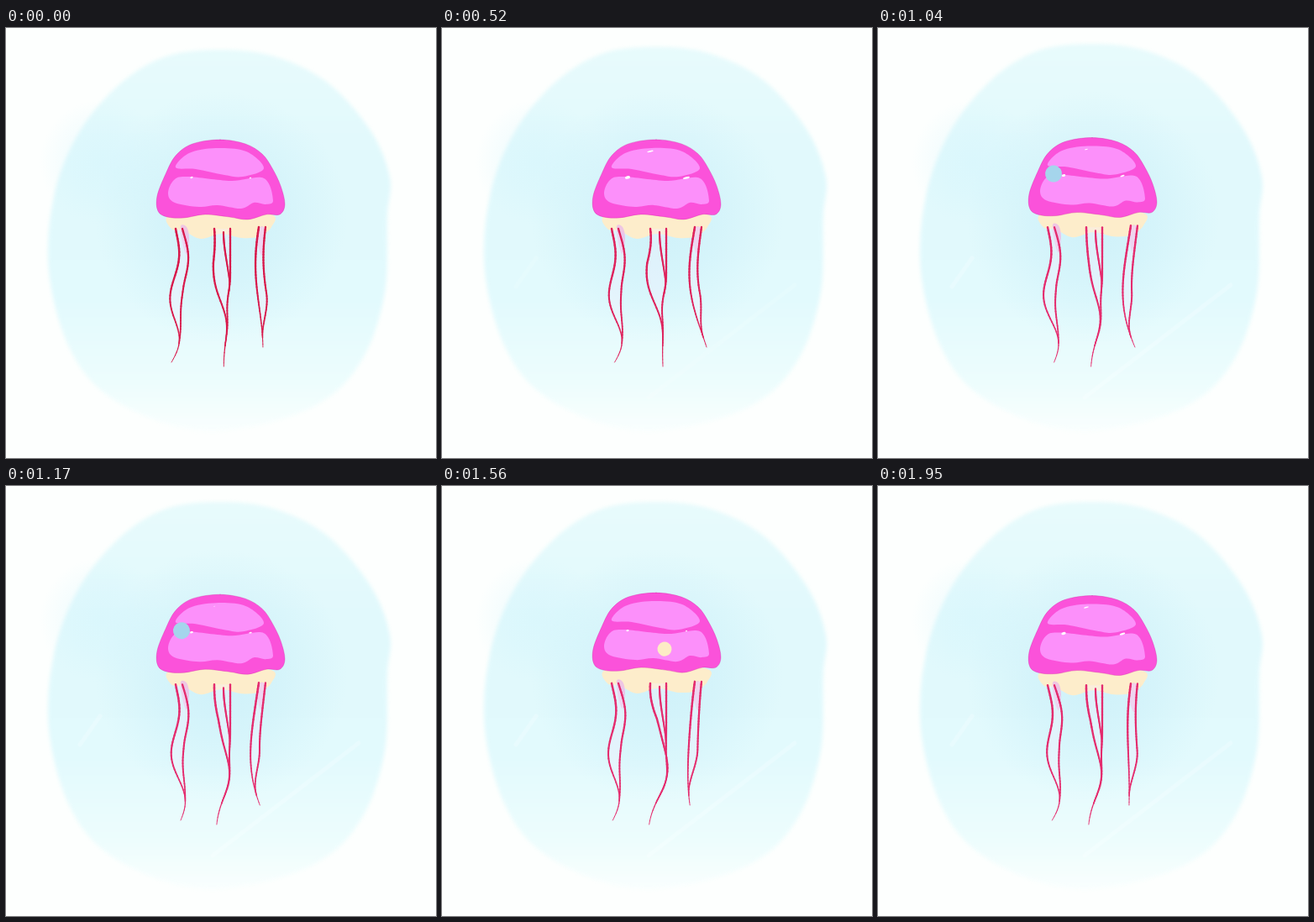
An HTML page with a canvas that plays this animation: 512 by 512 pixels, repeating every 2.08 s.

```html
<!DOCTYPE html>
<html lang="en">
<head>
<meta charset="utf-8">
<title>Jellyfish</title>
<style>
  html, body { margin: 0; width: 100%; height: 100%; overflow: hidden; background: #fdfffe; }
  canvas { display: block; width: 100vmin; height: 100vmin; }
</style>
</head>
<body>
<canvas id="sea" width="512" height="512"></canvas>
<script>
const ctx = document.getElementById('sea').getContext('2d');
const STEP = 130, STEPS = 16, TAU = 2 * Math.PI;

const { sin, cos, exp, min, max, PI } = Math;
const mix = (a, b, t) => a + (b - a) * t;
const smooth = (a, b, x) => {
  const t = min(1, max(0, (x - a) / (b - a)));
  return t * t * (3 - 2 * t);
};
const hump = (x, center, width) => exp(-(((x - center) / width) ** 2));

// Key points of the outlines, joined by closed splines.
const POOL = [[255,26],[190,34],[134,68],[86,126],[57,200],[51,290],[75,380],[120,437],
  [200,474],[275,478],[370,449],[424,395],[451,315],[454,225],[457,178],[434,122],[383,65],[320,34]];
const BELL = [[255,133],[222,138],[202,152],[190,174],[180,200],[181,218],[192,225],[212,226],
  [237,222],[266,225],[288,228],[310,222],[326,222],[332,210],[327,188],[317,167],[305,150],[285,138]];
const CROWN = [[250,143],[218,149],[202,166],[226,168],[260,175],[282,177],[307,167],[286,147]];
const BAND = [[216,177],[200,181],[193,197],[201,208],[230,213],[252,211],[280,215],[295,208],
  [309,210],[318,205],[307,179],[268,182]];
const SKIRT = [[195,223],[197,239],[212,242],[232,251],[256,245],[281,250],[302,248],[316,237],
  [316,222],[256,217]];

// Each tentacle rests on a curve and sways by a wave that runs down it.
const TENTACLES = [
  { x: 202, y: 239, tip: 398, gap: 8, grow: 14, merge: [.45, .86],
    rest: u => sin(3 * PI * u) * (3 + 6 * u),
    amp: u => 5 * u ** 1.5, peak: 1, lag: 5.5, period: 12.5, drift: 8 },
  { x: 248, y: 239, tip: 403, gap: 19, grow: 0, merge: [.35, .85], upright: true,
    rest: u => 6 * u + 12 * hump(u, .66, .22),
    amp: u => 9 * min(1, 4 * u) * sin(TAU * (u - .1) / 1.3), peak: 12, lag: 0, period: 18, drift: 0 },
  { x: 301, y: 237, tip: 380, gap: 8, grow: 5, merge: [.55, .92],
    rest: u => 4 * u * u - 7 * sin(PI * u),
    amp: u => 10 * u ** 1.5, peak: -4, lag: 8, period: 17, drift: 0 }
];

// Blemishes that pass over the bell: first step, place, radius, colour.
const SPOTS = [
  { from: 8, x: 209, y: 176, r: 10, fill: '#a5d5ec' },
  { from: 10, x: 278, y: 157, r: 3.8, fill: '#fdecc6' },
  { from: 12, x: 265, y: 200, r: 8.5, fill: '#fdecc6' }
];

function shape(points, fill) {
  const n = points.length, at = i => points[(i + n) % n];
  const handle = (i, side) => [0, 1].map(d => at(i)[d] + side * (at(i + 1)[d] - at(i - 1)[d]) / 6);
  ctx.beginPath();
  ctx.moveTo(...points[0]);
  for (let i = 0; i < n; i++) {
    ctx.bezierCurveTo(...handle(i, 1), ...handle(i + 1, -1), ...at(i + 1));
  }
  ctx.closePath();
  ctx.fillStyle = fill;
  ctx.fill();
}

function dot(x, y, rx, ry, fill) {
  ctx.beginPath();
  ctx.ellipse(x, y, rx, ry, -.25, 0, TAU);
  ctx.fillStyle = fill;
  ctx.fill();
}

function glow(x, y, r, rgb, alpha) {
  const g = ctx.createRadialGradient(x, y, 0, x, y, r);
  g.addColorStop(0, `rgba(${rgb},${alpha})`);
  g.addColorStop(.5, `rgba(${rgb},${alpha * .6})`);
  g.addColorStop(1, `rgba(${rgb},0)`);
  ctx.fillStyle = g;
  ctx.fillRect(x - r, y - r, 2 * r, 2 * r);
}

function backdrop(grown) {
  ctx.fillStyle = '#fdfffe';
  ctx.fillRect(0, 0, 512, 512);
  const g = ctx.createLinearGradient(0, 20, 0, 482);
  g.addColorStop(0, '#e8fbfc');
  g.addColorStop(.3, '#e1f9fc');
  g.addColorStop(.65, '#e2fafd');
  g.addColorStop(.87, '#edfdfd');
  g.addColorStop(1, '#fafffe');
  ctx.save();
  ctx.filter = 'blur(2px)';
  shape(POOL.map(([x, y]) => [x, y - 7 * grown * max(0, (200 - y) / 174)]), g);
  ctx.restore();
  glow(256, 225, 150, '190,234,247', .55);
  glow(115, 160, 75, '205,243,253', .35);
  ctx.strokeStyle = `rgba(255,255,255,${.2 * grown})`;
  ctx.lineWidth = 5;
  ctx.beginPath();
  ctx.moveTo(246, 440);
  ctx.lineTo(420, 306);
  ctx.moveTo(88, 308);
  ctx.lineTo(112, 274);
  ctx.stroke();
}

// Points along a strand, from the root (0) to the given part of its length.
function trace(xAt, top, tip, end = 1) {
  return Array.from({ length: 41 }, (_, i) => {
    const u = end * i / 40;
    return [xAt(u), mix(top, tip, u)];
  });
}

function strand(pts, color, from, to) {
  ctx.strokeStyle = color;
  ctx.lineCap = 'round';
  for (let i = 1; i < pts.length; i++) {
    ctx.lineWidth = mix(from, to, (i / pts.length) ** 2);
    ctx.beginPath();
    ctx.moveTo(...pts[i - 1]);
    ctx.lineTo(...pts[i]);
    ctx.stroke();
  }
}

function tentacle(t, step, drop, color) {
  const top = t.y + drop;
  const main = u => t.x + t.rest(u) + t.drift * u * step / STEPS
    + t.amp(u) * cos(TAU * (step - t.peak - t.lag * u) / t.period);
  const side = u => {
    const joined = smooth(...t.merge, u);
    return t.upright ? mix(t.x + t.gap, main(u), joined)
      : main(u) + (t.gap + t.grow * u) * (1 - joined);
  };
  const a = trace(main, top, t.tip), b = trace(side, top, t.tip, t.merge[1]);

  ctx.beginPath();
  a.slice(0, 35).concat(b.slice().reverse()).forEach(p => ctx.lineTo(...p));
  ctx.fillStyle = 'rgba(242,238,252,.35)';
  ctx.fill();
  strand(a, color, 2.5, .8);
  strand(b, color, 2.3, 1.5);
  if (t.upright) {
    const inner = u => mix(t.x + 11, side(u), smooth(0, .46, u));
    strand(trace(inner, top + 4, t.tip, .46), color, 2.2, 1.3);
  }
}

function petal(x, y, lean) {
  shape([[x, y], [x + 7, y + 1], [x + 8 + lean, y + 14], [x + 5 + lean, y + 33], [x + lean, y + 20]],
    'rgba(236,190,232,.85)');
}

function bell(step, lift) {
  ctx.save();
  ctx.translate(0, lift);
  shape(BELL, '#fb52da');
  ctx.strokeStyle = 'rgba(205,35,155,.4)';
  ctx.lineWidth = .8;
  ctx.stroke();
  shape(CROWN, '#fc90fa');
  shape(BAND, '#fc90fa');

  const spot = SPOTS.find(s => step >= s.from && step < s.from + 2);
  if (spot) dot(spot.x, spot.y, spot.r, spot.r, spot.fill);

  const shine = .5 + .5 * cos(TAU * (step - 5) / 12);
  dot(221, 178, 1.5 + 1.6 * shine, 1 + .8 * shine, '#fff');
  dot(291, 178.5, 1 + 3.2 * shine, .6 + .7 * shine, '#fff');
  dot(248, 147, 4 * shine, shine, '#fff');
  ctx.restore();
}

function draw(step) {
  const grown = min(1, step / 8);
  const lift = -6 * hump(step, 11.5, 3.7), drop = lift * .7;
  const color = `rgb(${mix(216, 228, grown)},${mix(26, 44, grown)},${mix(76, 110, grown)})`;

  backdrop(grown);
  shape(SKIRT.map(([x, y]) => [x, y + drop]), '#fdedcb');
  petal(208, 236 + drop, 2);
  petal(302, 238 + drop, -2);
  for (const t of TENTACLES) tentacle(t, step, drop, color);
  bell(step, lift);
}

let shown = -1;
function tick() {
  const step = Math.floor(performance.now() / STEP) % STEPS;
  if (step !== shown) draw(shown = step);
  requestAnimationFrame(tick);
}
tick();
</script>
</body>
</html>
```
